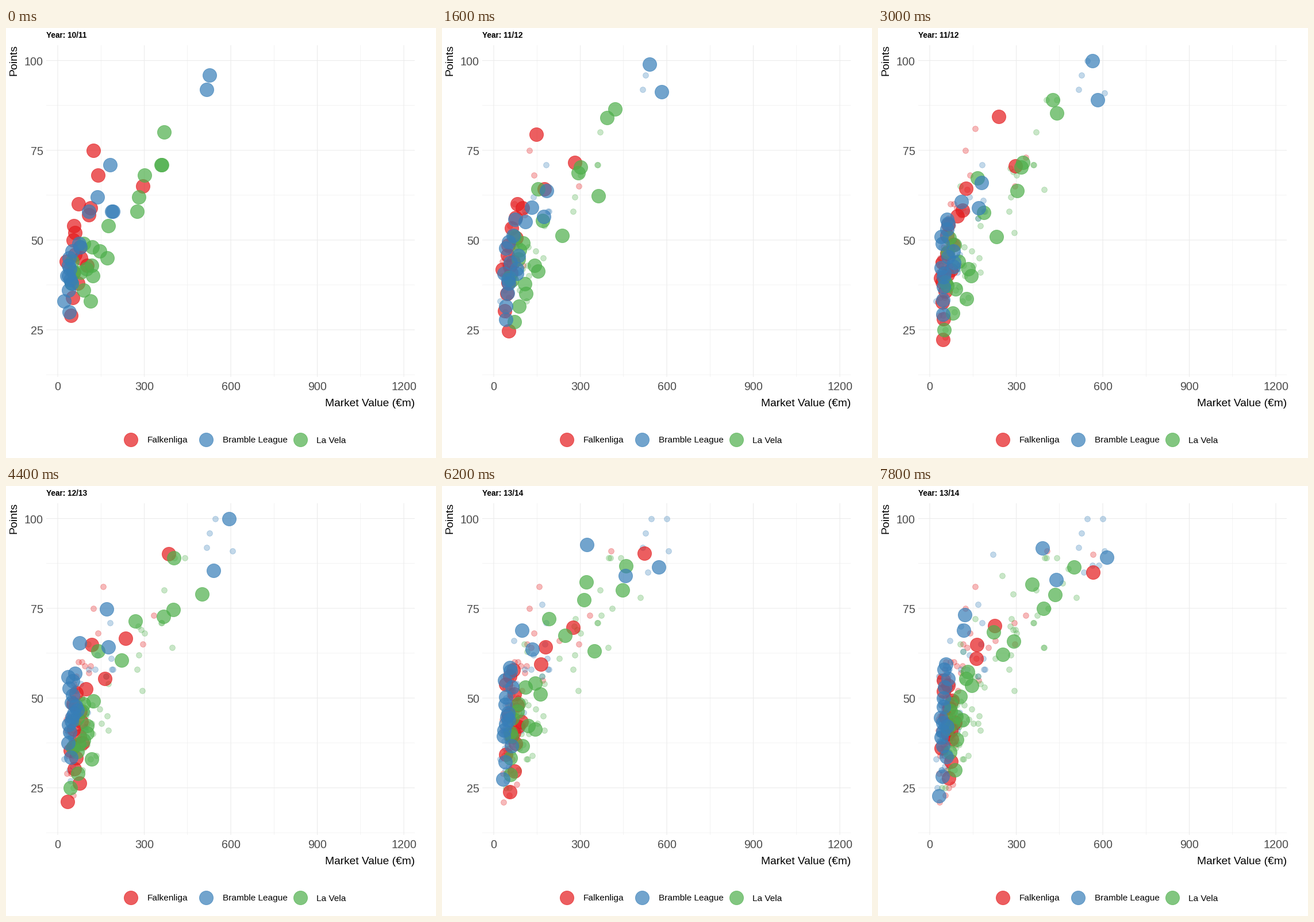
These frames come from a looping animation (748 by 748 pixels, 8 s). A matplotlib script:

```python
import numpy as np
import matplotlib.pyplot as plt
from matplotlib.animation import FuncAnimation

SIZE, DPI = 748, 100
FRAMES, INTERVAL = 40, 200
PT = 72 / DPI                      # points per pixel
STEP = 79 / 7                      # frames per season
KEYS = [round(STEP * k) for k in range(5)]
RED, GREEN, BLUE = "#E41A1C", "#4DAF4A", "#377EB8"
GRID, TICK = "#EBEBEB", "#4D4D4D"
CLUBS = {RED: 18, GREEN: 20, BLUE: 20}
TYPICAL = {RED: 62, GREEN: 84, BLUE: 48}     # usual market value of the pack

plt.rcParams["font.family"] = "Liberation Sans"
rng = np.random.default_rng(11)
tracks = {league: [] for league in CLUBS}


def px(value):
    return 90 + 0.5017 * value


def py(points):
    return 681.2 - 6.2467 * points


def season(league, high, low, *leaders):
    """Leaders are (value, points); the pack falls from high to low points."""
    u = np.linspace(0, 1, CLUBS[league] - len(leaders))
    # steep at both ends of the table, flat in the middle
    v = u ** 1.4
    drop = v + 0.1 * np.sin(2 * np.pi * v)
    points = np.round(high + (low - high) * drop)
    spread = np.exp(0.36 * np.clip(rng.normal(size=u.size), -2, 2))
    values = TYPICAL[league] * (1.15 - 0.3 * u) * spread
    clubs = np.vstack([leaders, np.column_stack([values, points])])
    tracks[league].append(np.column_stack([px(clubs[:, 0]), py(clubs[:, 1])]))


season(RED, 60, 29, (124, 75), (140, 68), (295, 65))
season(RED, 60, 23, (157, 81), (333, 73), (130, 64))
season(RED, 52, 21, (406, 91), (227, 66), (116, 65), (170, 55))
season(RED, 60, 25, (566, 90), (293, 71), (203, 64), (161, 61))
season(RED, 49, 31, (566, 79), (144, 69), (116, 66), (161, 61))

season(GREEN, 49, 33, (369, 80), (359, 71), (360, 71), (301, 68), (281, 62),
       (275, 58), (175, 54))
season(GREEN, 52, 25, (440, 89), (405, 89), (279, 70), (290, 69), (106, 65),
       (397, 64), (167, 56), (293, 52))
season(GREEN, 49, 25, (399, 89), (509, 78), (411, 75), (373, 73), (283, 72),
       (116, 63), (227, 61))
season(GREEN, 56, 30, (480, 86), (251, 84), (460, 82), (290, 79), (157, 72),
       (297, 69), (394, 64))
season(GREEN, 60, 30, (524, 87), (478, 79), (403, 75), (520, 70), (297, 64),
       (283, 62))

season(BLUE, 49, 30, (526, 96), (516, 92), (181, 71), (138, 62), (187, 58),
       (108, 58), (191, 58))
season(BLUE, 55, 27, (546, 100), (606, 91), (185, 61), (130, 58), (167, 56))
season(BLUE, 57, 34, (599, 100), (534, 85), (167, 76), (70, 66), (177, 65))
season(BLUE, 59, 25, (219, 90), (586, 87), (565, 87), (108, 70), (116, 63))
season(BLUE, 60, 20, (596, 94), (648, 92), (287, 78), (138, 77), (120, 76))


fig = plt.figure(figsize=(SIZE / DPI, SIZE / DPI), dpi=DPI, facecolor="white")
ax = fig.add_axes([0, 0, 1, 1])
ax.set_xlim(0, SIZE)
ax.set_ylim(SIZE, 0)
ax.axis("off")


def text(x, y, s, size, **kw):
    kw.setdefault("va", "center_baseline")
    return ax.text(x, y, s, fontsize=size * PT, **kw)


def dots(radius, alpha, color, z):
    return ax.scatter([], [], s=(2 * radius * PT) ** 2, c=color, alpha=alpha,
                      linewidths=0.9 * PT, edgecolors=color, zorder=z)


def grid(xs, ys, width):
    style = dict(color=GRID, lw=width * PT, zorder=1, snap=False)
    ax.vlines([px(x) for x in xs], 30, 607, **style)
    ax.hlines([py(y) for y in ys], 70, 711, **style)


grid(range(150, 1200, 300), np.arange(12.5, 100, 25), 0.55)
grid(range(0, 1201, 300), range(25, 101, 25), 1.07)

for value in range(0, 1201, 300):
    text(px(value), 622, str(value), 19.8, ha="center", color=TICK)
for value in range(25, 101, 25):
    text(65, py(value) + 0.5, str(value), 19.8, ha="right", color=TICK)
text(711, 652, "Market Value (€m)", 19.2, ha="right")
text(13.5, 29, "Points", 19.4, ha="center", va="top", rotation=90)
title = text(70, 11, "", 13.6, ha="left", weight="bold")

legend = [(217.5, RED, "Falkenliga"), (348.5, BLUE, "Bramble League"),
          (512, GREEN, "La Vela")]
for x, color, name in legend:
    dots(12, 0.7, color, 3).set_offsets([[x, 715.5]])
    text(x + 28.5, 716, name, 15.4, ha="left")

trails = {c: dots(4.9, 0.3, c, 2) for c in tracks}
heads = {c: dots(12, 0.7, c, 3) for c in tracks}


def update(frame):
    i = int(np.searchsorted(KEYS, frame, side="right")) - 1
    t = (frame - KEYS[i]) / (KEYS[i + 1] - KEYS[i])
    passed = sum(key < frame for key in KEYS)
    for color, track in tracks.items():
        heads[color].set_offsets(track[i] + t * (track[i + 1] - track[i]))
        trails[color].set_offsets(np.vstack([np.empty((0, 2))] + track[:passed]))
    year = 10 + round(frame / STEP)
    title.set_text(f"Year: {year}/{year + 1}")
    return [title, *trails.values(), *heads.values()]


anim = FuncAnimation(fig, update, frames=FRAMES, interval=INTERVAL,
                     init_func=lambda: update(0), repeat=True, repeat_delay=0)
plt.show()
```
